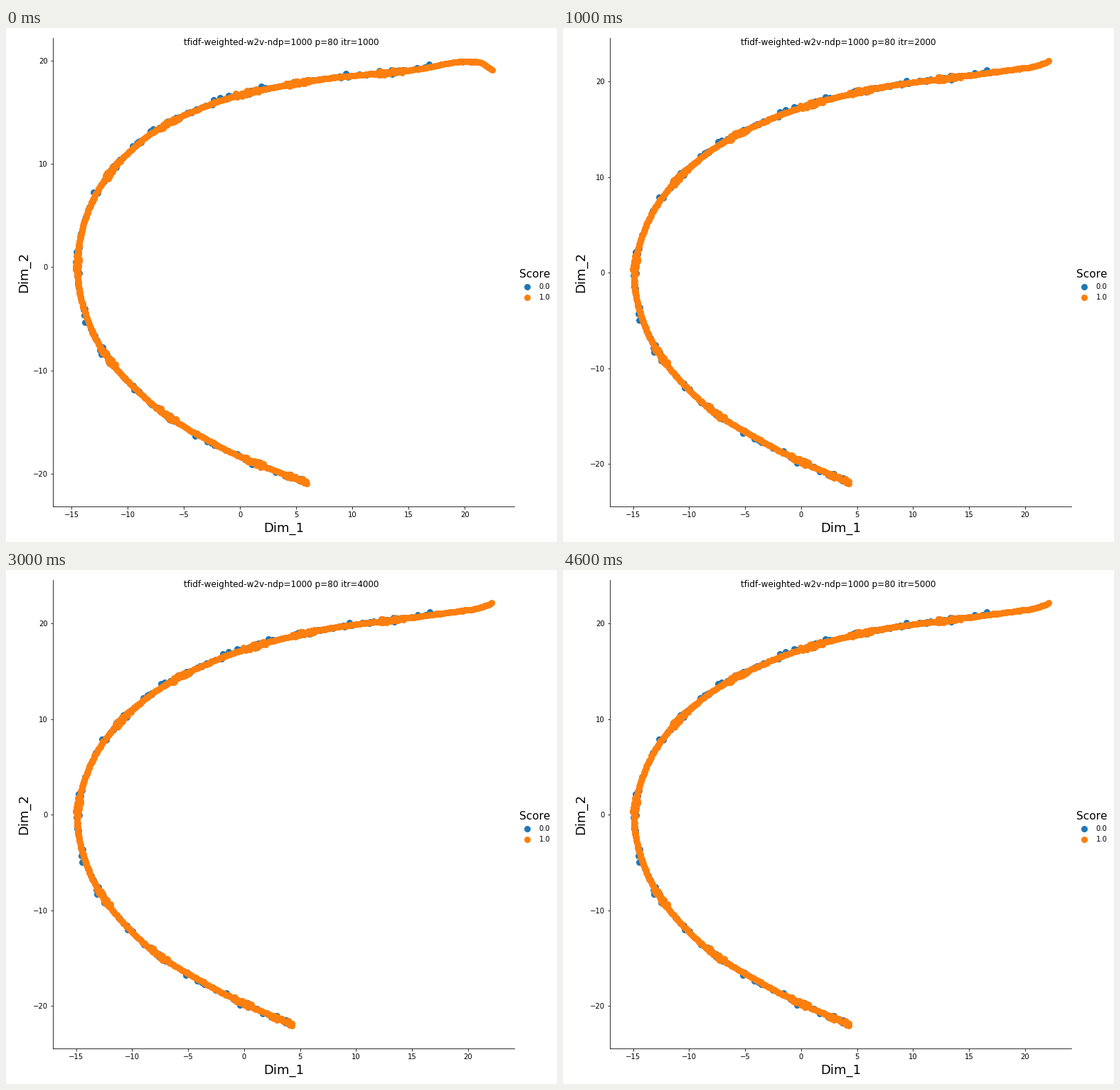
Write a matplotlib script that moves like this. It is 775 by 723 pixels and loops after 5000 ms.

```python
import numpy as np
import matplotlib.pyplot as plt
from matplotlib.animation import FuncAnimation

W, H, DPI = 775, 723, 72
BLUE, ORANGE = "#1f77b4", "#ff7f0e"
LEFT, RIGHT, TOP, BOTTOM = 65.8, 714.8, 14, 673.3
DOT = dict(s=7.5 ** 2, linewidths=1.5)

# Key points of the curve in pixels, before and after it settles.
EARLY = [(683.5, 59), (668, 49), (645, 47), (590, 56), (408, 77.5),
         (293, 105), (190, 159), (124, 238), (100, 338), (125, 435),
         (195, 520), (305, 591), (423, 640)]
SETTLED = [(683.5, 46.5), (668, 52.5), (648, 56), (590, 64), (408, 91.5),
           (296, 126), (196, 181), (126, 259), (100, 350), (118, 427),
           (185, 517), (290, 587), (402.5, 640)]

# Where the points crowd, as fractions of the curve's length.
CLUMPS = (.124, .233, .295, .392, .48, .602, .717, .815, .932, .985)


def trace(keys, n=600):
    """Sample a smooth curve: length fractions, points, outward normals."""
    keys = np.array(keys, float)
    knots = np.r_[0, np.cumsum(np.hypot(*np.diff(keys, axis=0).T))]
    slope = np.gradient(keys, knots, axis=0)
    t = np.linspace(0, knots[-1], n)
    i = np.clip(np.searchsorted(knots, t, "right") - 1, 0, len(keys) - 2)
    h = np.diff(knots)[i][:, None]
    s = (t - knots[i])[:, None] / h
    pts = ((1 + 2 * s) * (1 - s) ** 2 * keys[i]
           + s * (1 - s) ** 2 * h * slope[i]
           + s ** 2 * (3 - 2 * s) * keys[i + 1]
           + s ** 2 * (s - 1) * h * slope[i + 1])
    tan = np.gradient(pts, axis=0)
    tan /= np.hypot(*tan.T)[:, None]
    return t / t[-1], pts, np.c_[-tan[:, 1], tan[:, 0]]


def place(curve, t, off):
    """Pixel positions beside the curve, off pixels to the outside."""
    u, pts, normal = curve
    at = lambda a: np.c_[np.interp(t, u, a[:, 0]), np.interp(t, u, a[:, 1])]
    return at(pts) + off[:, None] * at(normal)


def clumps(rng, n):
    t = np.repeat(CLUMPS, n) + rng.uniform(-.014, .014, n * len(CLUMPS))
    return t, rng.uniform(-3, 3, t.size)


def make_classes(rng):
    """(fraction, offset) pairs of the blue and the orange class."""
    strip = np.linspace(0, 1, 700), rng.normal(0, .3, 700)
    specks = rng.uniform(.05, 1, 150), rng.normal(0, .9, 150)
    strays = rng.uniform(.05, .97, 22), rng.uniform(2, 5, 22)
    blue = np.hstack([specks, strays, clumps(rng, 7)])
    orange = np.hstack([strip, clumps(rng, 26)])
    return blue, orange


def limits(low, high, zero, scale):
    return (low - zero) / scale, (high - zero) / scale


plt.rcParams.update({"font.family": "DejaVu Sans", "text.kerning_factor": 6})
fig = plt.figure(figsize=(W / DPI, H / DPI), dpi=DPI, facecolor="white")
ax = fig.add_axes([LEFT / W, 1 - BOTTOM / H,
                   (RIGHT - LEFT) / W, (BOTTOM - TOP) / H])
ax.spines[["top", "right"]].set_visible(False)
ax.set_xlabel("Dim_1", fontsize=18)
ax.set_ylabel("Dim_2", fontsize=18)
ax.set_xticks(range(-15, 21, 5))
ax.set_yticks(range(-20, 21, 10))
title = fig.suptitle("", fontsize=12)

# Overlay measured in pixels from the top left.
canvas = fig.add_axes([0, 0, 1, 1])
canvas.set(xlim=(0, W), ylim=(H, 0))
canvas.axis("off")

classes = make_classes(np.random.default_rng(7))
dots = [canvas.scatter([], [], c=color, zorder=z, **DOT)
        for z, color in enumerate((BLUE, ORANGE), 2)]

canvas.text(744, 351, "Score", fontsize=15.3, ha="center")
for y, color, label in ((364, BLUE, "0.0"), (379, ORANGE, "1.0")):
    canvas.scatter(732.7, y, c=color, **DOT)
    canvas.text(749.8, y + 3.2, label, fontsize=10)

# Curve, then pixel of zero and pixels per unit for x and y.
LAYOUTS = [(trace(EARLY), (329.3, 15.8), (336.4, -14.53)),
           (trace(SETTLED), (334.8, 15.74), (344.2, -13.45))]


def update(i):
    curve, x_axis, y_axis = LAYOUTS[min(i, 1)]
    ax.set_xlim(limits(LEFT, RIGHT, *x_axis))
    ax.set_ylim(limits(BOTTOM, TOP, *y_axis))
    for dot, (t, off) in zip(dots, classes):
        dot.set_offsets(place(curve, t, off))
    title.set_text(f"tfidf-weighted-w2v-ndp=1000 p=80 itr={1000 * (i + 1)}")
    return [*dots, title]


anim = FuncAnimation(fig, update, frames=5, interval=1000,
                     repeat=True, repeat_delay=0, blit=False)
plt.show()
```
